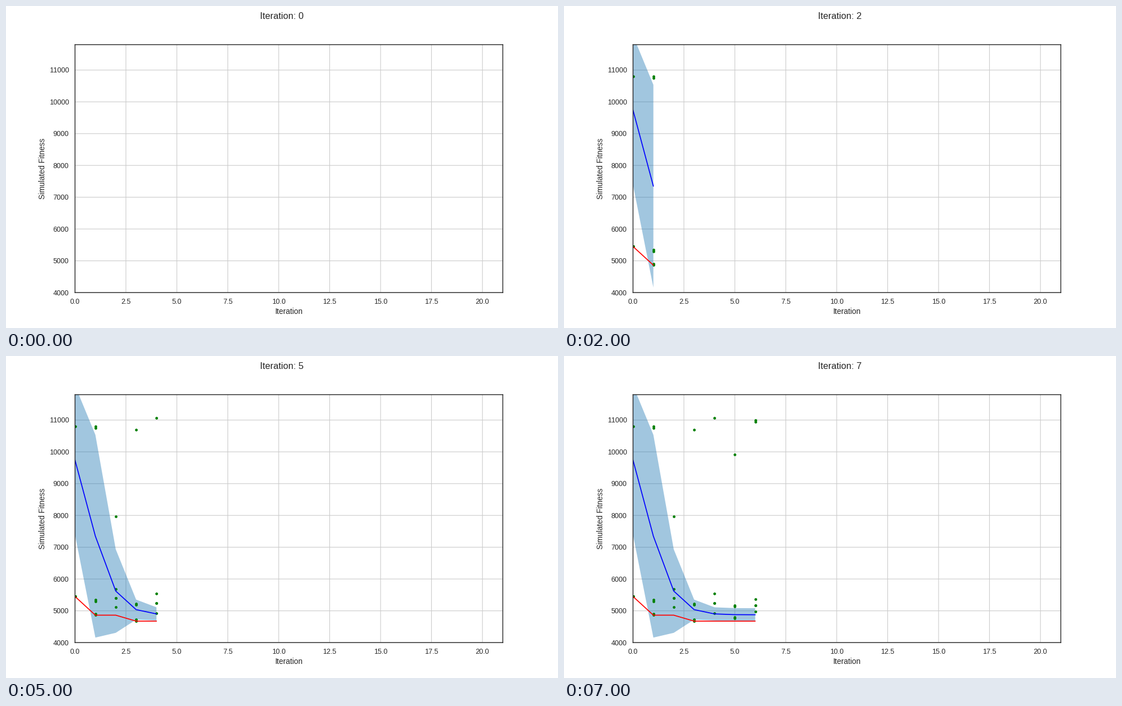
A matplotlib script for the animation above (8000 ms loop, 980 px wide and 572 px high).

```python
import numpy as np
import matplotlib.pyplot as plt
from matplotlib.animation import FuncAnimation
from matplotlib.collections import PolyCollection

DPI = 64
WIDTH, HEIGHT = 980, 572
PT = WIDTH / 12 / DPI  # one point of a 12 inch wide figure
INK = "0.15"
ROUNDS = 7

# key fitness values of each round: best, end of the main group, worst outlier
LOW = [5450, 4862, 5120, 4675, 4920, 4763, 4976]
HIGH = [5450, 5342, 5684, 5229, 5548, 5176, 5360]
OUTLIER = [10802, 10800, 7968, 10690, 11067, 9917, 10997]

steps = np.arange(ROUNDS)
best = np.minimum.accumulate(LOW)
mean = 4875 + 4865 * np.exp(-0.677 * steps**1.47)
spread = 205 + 3110 * np.exp(-0.66 * (steps - 0.75)**2)


def trials(i):
    """Odd rounds gather near both ends of the group, even ones spread out."""
    inner = 0.09 if i % 2 else 0.5
    share = np.array([0, inner, 1 - inner, 1])
    group = LOW[i] + (HIGH[i] - LOW[i]) * share
    outliers = [OUTLIER[i] - 50 * k for k in range(2 if i % 5 == 1 else 1)]
    return [(i, y) for y in (*group, *outliers)]


def band_outline(n):
    upper = np.column_stack([steps, mean + spread])[:n]
    lower = np.column_stack([steps, mean - spread])[:n]
    return np.vstack([upper, lower[::-1]])


plt.rcParams["font.family"] = "Liberation Sans"
plt.rcParams["text.kerning_factor"] = 6
plt.rcParams["toolbar"] = "None"

fig = plt.figure(figsize=(WIDTH / DPI, HEIGHT / DPI), dpi=DPI, facecolor="white")
ax = fig.add_axes([0.125, 0.11, 0.775, 0.77])
ax.set_xlim(0, 21)
ax.set_ylim(4000, 11800)
ax.set_xticks(np.arange(0, 20.1, 2.5))
ax.set_yticks(np.arange(4000, 11001, 1000))
ax.set_axisbelow(True)
ax.grid(color="0.8", lw=PT, snap=False)
ax.tick_params(left=False, bottom=False, length=6 * PT, pad=3.5 * PT,
               labelsize=11 * PT, labelcolor=INK)
for spine in ax.spines.values():
    spine.set(color=INK, linewidth=1.25 * PT, snap=False)

label = dict(fontsize=12 * PT, color=INK, labelpad=4 * PT)
ax.set_xlabel("Iteration", **label)
ax.set_ylabel("Simulated Fitness", **label)
title = fig.suptitle("", fontsize=14.4 * PT, color=INK, y=0.98)

band = PolyCollection([], facecolor="#1f77b4", edgecolor="none", alpha=0.42)
ax.add_collection(band, autolim=False)
dots = ax.scatter([], [], s=18 * PT**2, color="green", linewidths=0)
line = dict(lw=1.5 * PT, solid_capstyle="round")
mean_line, = ax.plot([], [], color="blue", **line)
best_line, = ax.plot([], [], color="red", **line)


def update(n):
    title.set_text(f"Iteration: {n}")
    points = [p for i in range(n) for p in trials(i)]
    dots.set_offsets(np.array(points, dtype=float).reshape(-1, 2))
    shown = n if n > 1 else 0  # a curve needs two points
    mean_line.set_data(steps[:shown], mean[:shown])
    best_line.set_data(steps[:shown], best[:shown])
    band.set_verts([band_outline(shown)] if shown else [])
    return title, dots, mean_line, best_line, band


anim = FuncAnimation(fig, update, frames=ROUNDS + 1, interval=1000,
                     init_func=lambda: update(0), repeat=True, repeat_delay=0)
plt.show()
```
